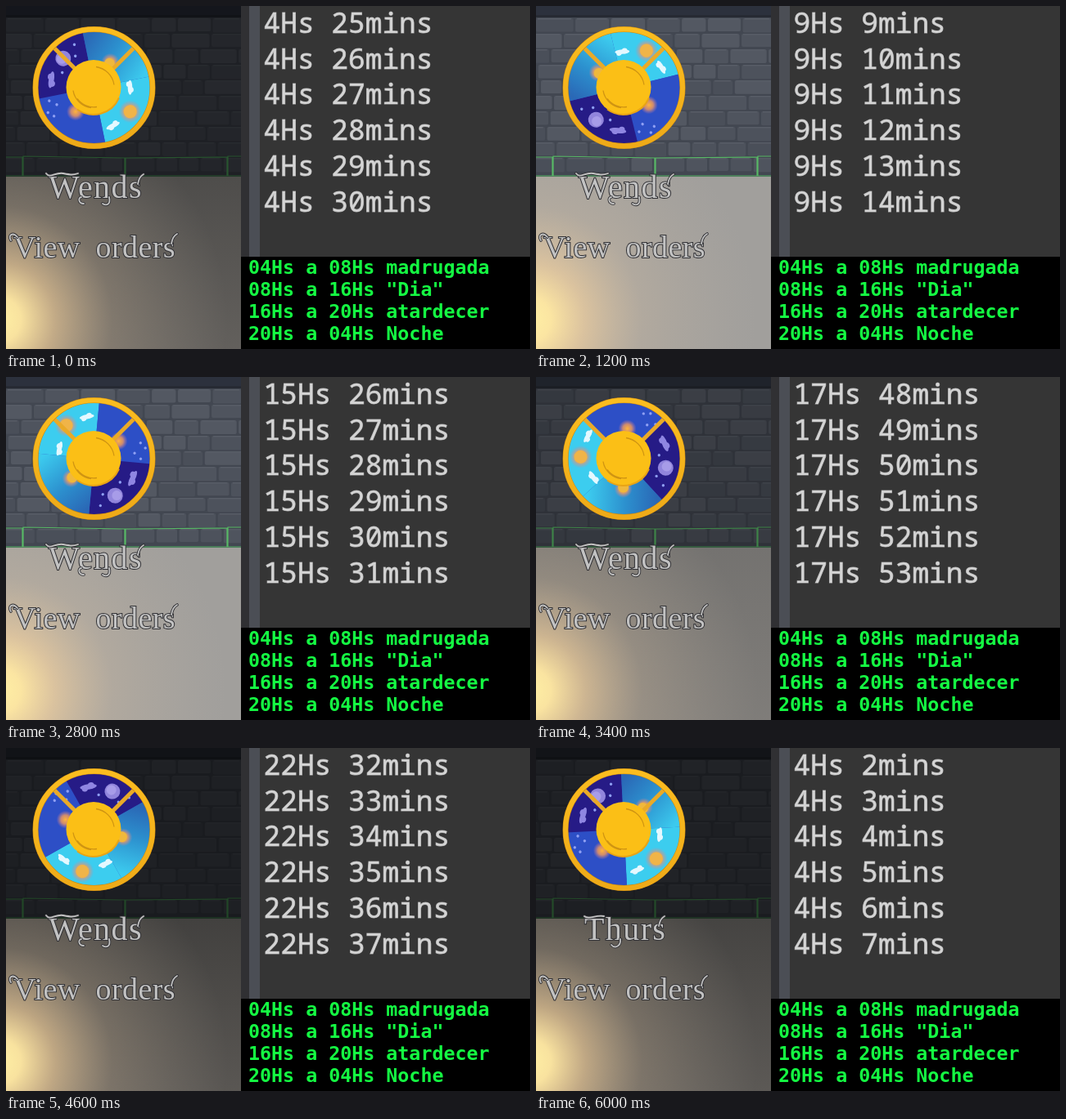
Recreate the animation shown at these times as an HTML page. Size 640 px wide and 420 px high, loop 6100 ms.

```html
<!DOCTYPE html>
<html lang="es">
<head>
<meta charset="utf-8">
<title>Day cycle</title>
<style>
  html, body { margin: 0; width: 100%; height: 100%; overflow: hidden; background: #000; }
  svg { display: block; width: 640px; height: 420px; }
  text { white-space: pre; }
  .log { font: 500 34.5px "Noto Sans Mono", monospace; fill: #d4d4d4; stroke: #d4d4d4; stroke-width: .9px; stroke-opacity: .7; }
  .key { font: bold 23.3px "DejaVu Sans Mono", monospace; fill: #14fa42; }
  .menu { font: 40px "Liberation Serif", serif; fill: #c2c2c2; stroke: #303034; stroke-width: 2px; paint-order: stroke; }
  .orders { font-size: 38px; letter-spacing: .4px; word-spacing: 9px; }
  .curl { fill: none; stroke: #c2c2c2; stroke-width: 1.8; stroke-linecap: round; }
  .edge { stroke: #303034; stroke-width: 3.6; }
</style>
</head>
<body>
<svg viewBox="0 0 640 420">
  <defs>
    <linearGradient id="shade" x1="0" y1="0" x2="0" y2="1">
      <stop offset="0" stop-color="#080706" stop-opacity=".62"/>
      <stop offset="1" stop-color="#0c0804" stop-opacity=".48"/>
    </linearGradient>
    <radialGradient id="lamp" gradientUnits="userSpaceOnUse" cx="-10" cy="384" r="280">
      <stop offset="0" stop-color="#fff0a4"/>
      <stop offset=".1" stop-color="#ffe8a2" stop-opacity=".96"/>
      <stop offset=".25" stop-color="#fad6a0" stop-opacity=".64"/>
      <stop offset=".5" stop-color="#dcc4a4" stop-opacity=".27"/>
      <stop offset="1" stop-color="#c4b8a8" stop-opacity="0"/>
    </radialGradient>
    <linearGradient id="dawn" gradientUnits="userSpaceOnUse" x1="-42" y1="0" x2="42" y2="0">
      <stop offset="0" stop-color="#2a68b6"/>
      <stop offset=".45" stop-color="#2c90ce"/>
      <stop offset="1" stop-color="#3ccaee"/>
    </linearGradient>
    <radialGradient id="glow">
      <stop offset="0" stop-color="#ffb43c"/>
      <stop offset=".5" stop-color="#f59a5a" stop-opacity=".8"/>
      <stop offset="1" stop-color="#d080a0" stop-opacity="0"/>
    </radialGradient>
    <linearGradient id="gold" x1="0" y1="0" x2="0" y2="1">
      <stop offset="0" stop-color="#fbbd20"/>
      <stop offset="1" stop-color="#eeaa18"/>
    </linearGradient>
    <clipPath id="room"><rect width="288" height="420"/></clipPath>
  </defs>

  <g clip-path="url(#room)">
    <rect width="288" height="209" fill="#424751"/>
    <g id="bricks"></g>
    <rect width="288" height="12" fill="#2c313d"/>
    <rect y="11" width="288" height="3" fill="#262a33"/>
    <path d="M0 185H20V208H0M21 208V184L145 186V208ZM146 208V186L270 185V208ZM288 184H271V208H288" fill="none" stroke="#58b966" stroke-width="1.2"/>
    <rect id="wallDark" width="288" height="209"/>
    <rect y="209" width="288" height="211" fill="#a19f9c"/>
    <rect id="floorDark" y="209" width="288" height="211" fill="url(#shade)"/>
    <rect y="209" width="288" height="211" fill="url(#lamp)"/>
  </g>

  <g transform="translate(107.5 100)">
    <circle r="72" fill="#2d4fc6"/>
    <g id="disk"></g>
    <path d="M-50-50L-20-20M50-50L20-20" stroke="#e9aa28" stroke-width="5"/>
    <circle r="71.5" fill="none" stroke="#c88710" stroke-width="7"/>
    <circle r="71.5" fill="none" stroke="url(#gold)" stroke-width="6"/>
    <g transform="translate(-.5 -.5)">
      <circle r="33.5" fill="#fbbf16"/>
      <path d="M-25 4A25 25 0 0 0 -3 25M3-25A26 26 0 0 1 25-3M-20 14A25 25 0 0 0 4 24" fill="none" stroke="#cf9412" stroke-width="1.3"/>
      <path d="M31 13A34 34 0 0 1 -20 27" fill="none" stroke="#e9a414" stroke-width="2"/>
    </g>
  </g>

  <text id="day" class="menu" y="235" letter-spacing="1.4"></text>
  <text class="menu orders" x="9" y="308">View orders</text>
  <g id="curls"></g>

  <rect x="287" width="353" height="307" fill="#353535"/>
  <rect x="287" width="10" height="307" fill="#303033"/>
  <rect x="297" width="13" height="307" fill="#4b4e55"/>
  <g id="log"></g>
  <rect x="287" y="307" width="353" height="113"/>
  <g id="key"></g>
</svg>
<script>
const NS = "http://www.w3.org/2000/svg";
const $ = id => document.getElementById(id);

function add(parent, tag, attrs, content = "") {
  const el = document.createElementNS(NS, tag);
  for (const k in attrs) el.setAttribute(k, attrs[k]);
  el.textContent = content;
  parent.append(el);
  return el;
}

let seed = 7;
const rand = () => (seed = seed * 16807 % 2147483647) / 2147483647;

function buildWall() {
  const tones = ["#4a4f59", "#4f545e", "#535862", "#4d525c"];
  for (let row = 0; row < 10; row++) {
    const y = 15 + row * 19;
    let x = -rand() * 35;
    while (x < 288) {
      const w = 26 + rand() * 24, h = 16 + rand() * 1.5;
      add($("bricks"), "rect", { x, y, width: w - 2.5, height: h, rx: 2, fill: tones[rand() * 4 | 0] });
      add($("bricks"), "rect", { x: x + 2, y, width: w - 7, height: 1.5, fill: "#585d67" });
      x += w;
    }
  }
}

// Polar placement on the sky disk; angle 0 is the sun's direction.
const polar = (deg, r) => [Math.cos(deg * Math.PI / 180) * r, Math.sin(deg * Math.PI / 180) * r];
const disk = $("disk");

function sector(from, to, fill) {
  add(disk, "path", { d: `M0 0L${polar(from, 71)}A71 71 0 0 1 ${polar(to, 71)}Z`, fill });
}
function dot(deg, r, size, fill) {
  const [cx, cy] = polar(deg, r);
  add(disk, "circle", { cx, cy, r: size, fill });
}
function cloud(deg, r, size, fill) {
  const [x, y] = polar(deg, r);
  const g = add(disk, "g", { transform: `translate(${x} ${y}) rotate(${deg + 90}) scale(${size})`, fill });
  add(g, "ellipse", { rx: 9, ry: 2.8 });
  add(g, "circle", { cx: -4, cy: 1.5, r: 3.2 });
  add(g, "circle", { cx: 3, cy: -1, r: 3.4 });
}

function buildDisk() {
  sector(-45, 45, "#3ccdef");
  sector(45, 135, "#2d4fc6");
  sector(135, 225, "#261b86");
  sector(-135, -45, "url(#dawn)");
  for (const a of [-91, 94]) dot(a, 37, 11, "url(#glow)");
  dot(-91, 35, 6.5, "#f0b83c");
  dot(0, 53, 14, "url(#glow)");
  dot(0, 53, 8, "#f0b448");
  cloud(30, 52, 1, "#e4f8ff");
  cloud(-34, 44, 1, "#e4f8ff");
  dot(190, 52, 9.5, "#9185dc");
  dot(188, 53, 6, "#a79ce8");
  cloud(157, 53, 1.15, "#8f86e2");
  for (const [a, r] of [[111, 60], [122, 50], [130, 57], [118, 64], [212, 58], [172, 43], [206, 45]])
    dot(a, r, 1.7, "#8fa0f4");
}

function curl(parent, d) {
  add(parent, "path", { d, class: "curl edge" });
  add(parent, "path", { d, class: "curl" });
}

const days = [
  { name: "Wends", x: 52, curls: ["M49 205C54 212 60 203 70 205S82 207 88 205", "M92 234C88 234 88 242 95 242", "M126 234C128 243 123 245 118 242", "M161 218C162 212 164 208 168 206"] },
  { name: "Thurs", x: 59, curls: ["M59 206C65 211 72 204 83 206", "M103 234C104 243 96 246 92 241", "M150 218C151 212 153 208 157 206"] }
];

function buildText() {
  for (const d of days) {
    d.group = add($("curls"), "g", {});
    d.curls.forEach(c => curl(d.group, c));
  }
  curl($("curls"), "M14 283C8 276 2 281 6 287");
  curl($("curls"), "M202 291C203 285 205 281 209 279");
  ["04Hs a 08Hs madrugada", '08Hs a 16Hs "Dia"', "16Hs a 20Hs atardecer", "20Hs a 04Hs Noche"]
    .forEach((s, i) => add($("key"), "text", { class: "key", x: 296, y: 328 + i * 27.1 }, s));
}

buildWall();
buildDisk();
buildText();
const lines = Array.from({ length: 6 }, (_, i) => add($("log"), "text", { class: "log", x: 314.5, y: 33 + i * 43.7 }));

const LOOP = 6100, STEP = 100;

// Quarter turns since 04:00: dawn and dusk take 4 h each, day and night 8 h.
function quarters(min) {
  const h = (min / 60 + 20) % 24;
  if (h < 4) return h / 4;
  if (h < 12) return 1 + (h - 4) / 8;
  if (h < 16) return 2 + (h - 12) / 4;
  return 3 + (h - 16) / 8;
}

function darkness(q) {
  if (q < 1) return 1 - q;
  if (q < 2) return 0;
  return Math.min(1, q - 2);
}

function render(t) {
  const clock = 270.6 + t * .2362, last = Math.floor(clock);
  const q = quarters(clock), dark = darkness(q);
  disk.setAttribute("transform", `rotate(${45 - 90 * q})`);
  $("wallDark").setAttribute("opacity", .62 * dark);
  $("floorDark").setAttribute("opacity", dark);
  lines.forEach((el, i) => {
    const m = last - 5 + i;
    el.textContent = `${Math.floor(m / 60) % 24}Hs ${m % 60}mins`;
  });
  const today = days[last < 1440 ? 0 : 1];
  $("day").textContent = today.name;
  $("day").setAttribute("x", today.x);
  days.forEach(d => d.group.setAttribute("visibility", d === today ? "visible" : "hidden"));
}

const start = performance.now();
let shown = -1;
function tick() {
  const t = Math.floor((performance.now() - start) % LOOP / STEP) * STEP;
  if (t !== shown) render(shown = t);
  requestAnimationFrame(tick);
}
tick();
</script>
</body>
</html>
```
